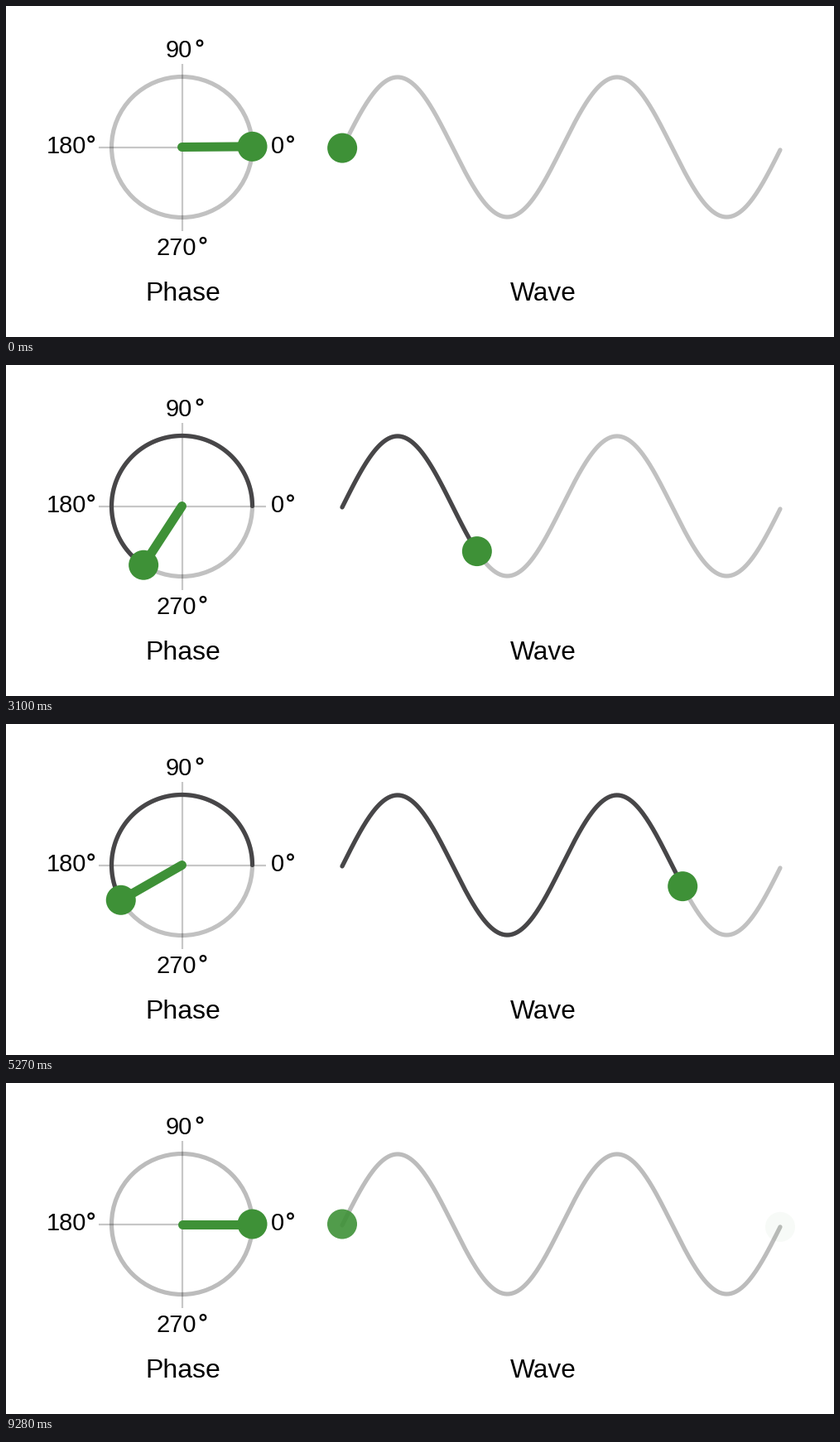
Recreate the animation shown at these times as a matplotlib script. Size 1000 px wide and 400 px high, loop 9.31 s.

```python
import numpy as np
import matplotlib.pyplot as plt
from matplotlib.animation import FuncAnimation
from matplotlib.patches import Circle

W, H, DPI = 1000, 400, 100
FRAMES, STEP = 490, 19          # 9310 ms per loop
PX = 72 / DPI                   # points per pixel

GREEN, DARK = "#3e9137", "#474648"
CX, CY, R = 212.5, 170.5, 85    # phase circle
X0, X1 = 406, 935               # ends of the wave
ZERO, HALF, AMP = 406.7, 132.5, 84.5
LINE, DOT_R = 5.2, 18
TURN_START, TURN_TIME, LAG = -140, 7980, 33

plt.rcParams["font.family"] = "Liberation Sans"
fig = plt.figure(figsize=(W / DPI, H / DPI), dpi=DPI, facecolor="white")
ax = fig.add_axes([0, 0, 1, 1])
ax.set(xlim=(0, W), ylim=(H, 0))
ax.axis("off")


def stroke(x, y, width, color, z, alpha=1):
    return ax.plot(x, y, color=color, lw=width * PX, alpha=alpha, zorder=z,
                   solid_capstyle="round", solid_joinstyle="round")[0]


def dot(x, y, z=6):
    return ax.add_patch(Circle((x, y), DOT_R, fc=GREEN, lw=0, zorder=z))


def label(x, y, text, size):
    ax.text(x, y, text, size=size * PX, color="black",
            ha="center", va="baseline", zorder=8)


def degrees(x, y, text, ring_x):
    label(x, y, text, 29)
    ax.add_patch(Circle((ring_x, y - 17.7), 3.3, fill=False, ec="black",
                        lw=2.2 * PX, zorder=8))


def on_circle(angle):
    return CX + R * np.cos(angle), CY - R * np.sin(angle)


def ease(ms):
    """Quadratic ease in and out over the two turns."""
    t = np.clip((ms - TURN_START) / TURN_TIME, 0, 1)
    return 2 * t * t if t < 0.5 else 1 - 2 * (1 - t) ** 2


# Sine curve, with its arc length for steady travel along the path
wave_x = np.linspace(X0, X1, 400)
wave_y = CY - AMP * np.sin(np.pi * (wave_x - ZERO) / HALF)
length = np.concatenate(
    [[0], np.cumsum(np.hypot(np.diff(wave_x), np.diff(wave_y)))])

# Static parts
ax.add_patch(Circle((CX, CY), R, fill=False, ec="black", alpha=0.245,
                    lw=LINE * PX, zorder=1))
stroke(wave_x, wave_y, LINE, "black", 1, 0.245)
for xs, ys in (([112, 314], [CY, CY]), ([CX, CX], [70, 271.5])):
    ax.plot(xs, ys, color="black", alpha=0.22, lw=2.2 * PX, zorder=2,
            solid_capstyle="butt")

degrees(209, 62.5, "90", 234)
degrees(73, 178.5, "180", 102.7)
degrees(328, 178.5, "0", 343.5)
degrees(206, 301, "270", 238)
label(213.5, 355.5, "Phase", 32)
label(648.3, 355.5, "Wave", 31.7)

# Moving parts
arc_trail = stroke([], [], LINE, DARK, 3)
wave_trail = stroke([], [], LINE, DARK, 3)
arm = stroke([], [], 11, GREEN, 5)
phase_dot = dot(CX + R, CY)
wave_dot = dot(X0, CY)
next_dot = dot(X0, CY)


def draw(i):
    ms = i * STEP
    angle = 4 * np.pi * ease(ms)
    swept = angle - 2 * np.pi if angle > 2 * np.pi else angle
    arc_trail.set_data(*on_circle(np.linspace(0, swept, 120)))
    px, py = on_circle(angle)
    arm.set_data([CX, px], [CY, py])
    phase_dot.center = px, py

    s = ease(ms - LAG) * length[-1]
    x, y = np.interp(s, length, wave_x), np.interp(s, length, wave_y)
    n = np.searchsorted(length, s)
    wave_trail.set_data(np.append(wave_x[:n], x), np.append(wave_y[:n], y))
    wave_dot.center = x, y

    # Dissolve back to the starting state
    fade = 1 - np.clip((ms - 8575) / 725, 0, 1)
    for part in (arc_trail, wave_trail, wave_dot):
        part.set_alpha(fade)
    next_dot.set_alpha(np.clip((ms - 8600) / 745, 0, 1))
    return arc_trail, wave_trail, arm, phase_dot, wave_dot, next_dot


anim = FuncAnimation(fig, draw, frames=FRAMES, interval=STEP,
                     repeat=True, repeat_delay=0, blit=False)
plt.show()
```
